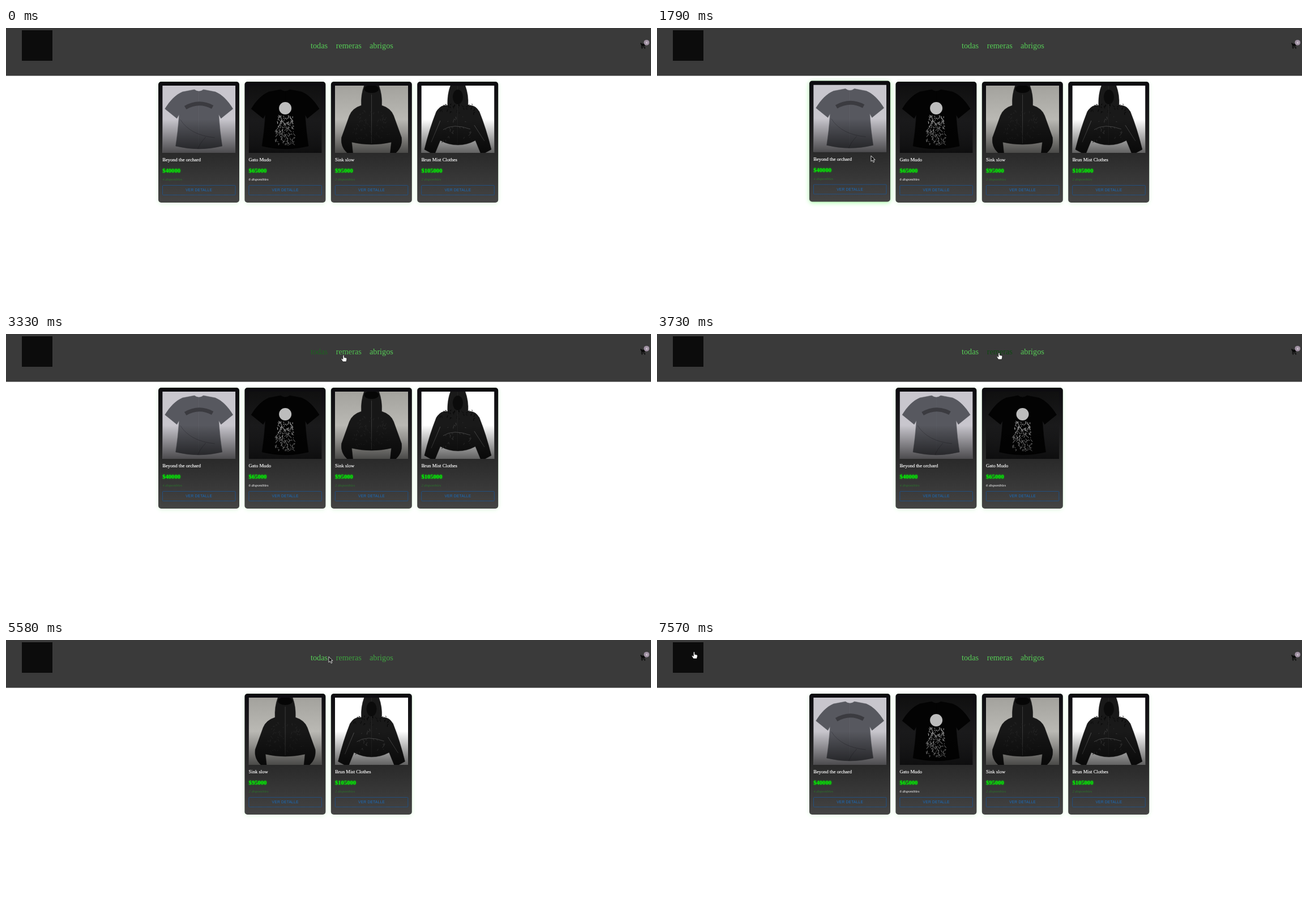
An HTML page that plays this animation: 1139 px wide and 492 px high, repeating every 8 s.

```html
<!DOCTYPE html>
<html lang="es">
<head>
<meta charset="utf-8">
<title>Tienda</title>
<style>
  html, body { margin: 0; width: 100%; height: 100%; overflow: hidden; background: #fff; }
  svg { display: block; width: 1139px; height: 492px; }
  text { font-family: "Liberation Serif", "Times New Roman", serif; }
  .link { font-size: 14.2px; }
  .name { font-size: 8.6px; fill: #fff; stroke: #fff; stroke-width: .15; }
  .price { font-size: 10.6px; font-weight: bold; fill: #00f500; text-shadow: 0 0 3px rgba(0, 255, 0, .7); }
  .stock { font-size: 6.6px; font-style: italic; fill: #2b742b; }
  .stock.many { fill: #fff; }
  .button { font: 6.7px "Liberation Sans", Arial, sans-serif; letter-spacing: .19px; fill: #1a6cbc; text-anchor: middle; }
</style>
</head>
<body>
<svg viewBox="0 0 1139 492" xmlns="http://www.w3.org/2000/svg">
  <defs>
    <linearGradient id="cardFill" x2="0" y2="1">
      <stop stop-color="#0c0b0f"/><stop offset=".55" stop-color="#272727"/><stop offset="1" stop-color="#444"/>
    </linearGradient>
    <linearGradient id="fade" x2="0" y2="1">
      <stop offset=".5" stop-opacity="0"/><stop offset="1" stop-opacity=".62"/>
    </linearGradient>
    <linearGradient id="wall" x2="0" y2="1"><stop stop-color="#a3a29d"/><stop offset=".7" stop-color="#c3c2bd"/></linearGradient>
    <linearGradient id="night" x2="0" y2="1"><stop stop-color="#101010"/><stop offset="1" stop-color="#242426"/></linearGradient>
    <filter id="blur" x="-20%" y="-20%" width="140%" height="140%"><feGaussianBlur stdDeviation="4"/></filter>
    <clipPath id="photo"><rect width="129" height="119"/></clipPath>
  </defs>
  <rect width="1139" height="492" fill="#fff"/>
  <rect width="1139" height="84.6" fill="#3a3a3a"/>
  <rect x="28" y="4" width="54" height="54" fill="#0c0c0c"/>
  <g id="nav"></g>
  <g fill="#0a0a0a">
    <path d="M1120 26.4h2l.8 1.4h6.6l-1.8 4.4h-4.4l-.7 1.1h6.2v1h-7.6l1.1-2.4-1.8-4.5h-.4z"/>
    <circle cx="1123.2" cy="35.5" r="1.1"/><circle cx="1128" cy="35.5" r="1.1"/>
  </g>
  <circle cx="1131.2" cy="25.8" r="4.9" fill="#a192a4"/>
  <text x="1131.2" y="27.9" font-size="6" fill="#fff" text-anchor="middle">4</text>
  <g id="cards"></g>
  <g id="cursor">
    <path id="arrow" d="M0 0V10L2.4 7.9 4.2 11.7 5.9 10.9 4.2 7.2H7.2Z" fill="#111" stroke="#fff" stroke-width=".8"/>
    <path id="hand" d="M-1.1 1Q0-.9 1.1 1V4.4L4.8 5.2Q6 5.6 5.9 7.2L4.9 12H-1.2L-4 7.6Q-3.9 6-2.6 6.6L-1.1 7.8Z" fill="#fff" stroke="#111" stroke-width=".7"/>
  </g>
</svg>
<script>
const LOOP = 8000, PITCH = 152.4, CARD_W = 143, CARD_H = 214, CARD_Y = 95;
const FADE = 200, STEP = 10;
const $ = id => document.getElementById(id);
const clamp = v => Math.max(0, Math.min(1, v));

function seeded(seed) {
  return () => (seed = (seed * 16807) % 2147483647) / 2147483647;
}

// Random short strokes around the vertical axis, widening downwards.
function scratches(count, top, height, width, color) {
  const rnd = seeded(count);
  let d = '';
  for (let i = 0; i < count; i++) {
    const v = rnd();
    const x = (rnd() - .5) * width * (.7 + .3 * v);
    d += `M${x.toFixed(1)} ${(top + v * height).toFixed(1)}l${((rnd() - .5) * 7).toFixed(1)} ${(rnd() * 5).toFixed(1)}`;
  }
  return `<path d="${d}" fill="none" stroke="${color}"/>`;
}

const backdrop = fill => `<rect width="129" height="119" fill="${fill}"/>`;

// Outline of the right half, mirrored on the garment's axis, with details on top.
function garment(color, half, details) {
  const side = `<path d="${half}Z" fill="${color}" stroke="${color}" stroke-width=".5"/>`;
  return `<g transform="translate(64.5 0)">${side}<g transform="scale(-1 1)">${side}</g>${details}</g>`;
}

const tee = 'M0 10Q4 10 8 7L29 11Q46 18 60 41L39 58 35 51Q37 82 41 107Q20 112 0 112';
const hood = 'M0 0H13Q19 16 18 35';

const photos = [
  backdrop('#c8c6cd') + garment('#57585f', tee,
    '<path d="M-24 39Q0 25 24 38" fill="none" stroke="#3b3b40" stroke-width="7"/>' +
    '<path d="M-33 60Q-15 88 28 92M12 91Q1 103-2 112" fill="none" stroke="#44444b"/>'),
  backdrop('url(#night)') + garment('#030303', tee,
    '<circle cy="40" r="11" fill="#bdbdbd"/>' + scratches(160, 52, 52, 38, '#a8a8a8')),
  backdrop('url(#wall)') + garment('#171717', hood + 'Q34 40 39 53L53 92Q55 108 43 119H33L35 100Q18 104 0 104',
    '<ellipse cy="6" rx="13" ry="7" fill="#060606"/><path d="M0 16V102" stroke="#3a3a3a"/>' +
    scratches(70, 44, 50, 70, '#252525')),
  backdrop('#fff') + garment('#191919', hood + 'Q30 33 38 46Q50 76 59 113L48 119 40 119 31 97Q16 105 0 105',
    '<ellipse cy="20" rx="9" ry="13" fill="#0b0b0b"/>' + scratches(40, 32, 16, 70, '#070707') +
    scratches(26, 55, 42, 64, '#3d3d3d') +
    '<path d="M-26 78Q-8 66 22 77M29 70L47 98M-31 62L-47 100" fill="none" stroke="#505050"/>')
];

const products = [
  ['Beyond the orchard', 40000, 4],
  ['Gato Mudo', 65000, 6],
  ['Sink slow', 95000, 2],
  ['Brun Mist Clothes', 105000, 2]
];

const panel = extra => `<rect width="${CARD_W}" height="${CARD_H}" rx="5" ${extra}/>`;

$('cards').innerHTML = products.map(([name, price, stock], i) => `<g>
  ${panel('class="glow" y="1.5" fill="#0f0" filter="url(#blur)"')}
  ${panel('fill="url(#cardFill)"')}
  <g transform="translate(7.2 7)" clip-path="url(#photo)">${photos[i]}${backdrop('url(#fade)')}</g>
  <text class="name" x="7.2" y="141">${name}</text>
  <text class="price" x="7.2" y="161">$${price}</text>
  <text class="stock${stock > 5 ? ' many' : ''}" x="7.2" y="175">${stock} disponibles</text>
  <rect x="7.5" y="183.5" width="128.5" height="17" rx="1" fill="none" stroke="#1d5590" stroke-width=".8"/>
  <text class="button" x="71.7" y="194.3">VER DETALLE</text></g>`).join('');

const menu = [
  { label: 'todas', x: 538, width: 30 },
  { label: 'remeras', x: 582.8, width: 45 },
  { label: 'abrigos', x: 642, width: 42 }
];
$('nav').innerHTML = menu.map(m => `<text class="link" x="${m.x}" y="36.3">${m.label}</text>`).join('');

const cards = [...$('cards').children];
const links = [...$('nav').children];

// The cursor travels to each stop between the times `from` and `to`, then rests there.
const stop = (from, to, x, y) => ({ from, to, x, y });
const entry = { x: 1062, y: 480 };
const stops = [
  stop(320, 730, 183, 22),
  stop(1520, 1600, 40, 24),
  stop(1600, 1790, 377, 226),
  stop(1790, 2180, 745, 240),
  stop(2180, 2320, 690, 246),
  stop(2390, 2680, 350, 245),
  stop(2680, 3070, 553, 33),
  stop(3260, 3330, 596, 37),
  stop(3330, 3560, 604, 33),
  stop(4130, 4860, 664, 33),
  stop(5390, 5580, 570, 29.5),
  stop(5580, 5850, 553, 30),
  stop(6780, 7170, 65.5, 21)
];

function cursorAt(t) {
  let { x, y } = entry;
  for (const s of stops) {
    const k = clamp((t - s.from) / (s.to - s.from));
    x += (s.x - x) * k;
    y += (s.y - y) * k;
  }
  return { x, y };
}

function shownAt(t) {
  if (t >= 3600 && t < 4990) return [0, 1];
  if (t >= 4990 && t < 6250) return [2, 3];
  return [0, 1, 2, 3];
}

const cardX = (slot, count) => 269 + ((4 - count) / 2 + slot) * PITCH;
const inBox = (p, x, y, w, h) => p.x >= x && p.x <= x + w && p.y >= y && p.y <= y + h;
const overLink = (t, m) => inBox(cursorAt(t), m.x, 22, m.width, 18);
const overLogo = t => inBox(cursorAt(t), 22, 4, 67, 55);

function overCard(t, i) {
  const shown = shownAt(t), slot = shown.indexOf(i);
  return slot >= 0 && inBox(cursorAt(t), cardX(slot, shown.length), CARD_Y, CARD_W, CARD_H);
}

// Hover amount 0..1, replayed from the recent cursor path.
function hoverAmount(t, isOver) {
  let amount = 0;
  for (let s = t - 3 * FADE; s < t; s += STEP) {
    amount = clamp(amount + (isOver(s) ? STEP : -STEP) / FADE);
  }
  return amount;
}

const mix = (from, to, k) => `rgb(${from.map((v, i) => Math.round(v + (to[i] - v) * k))})`;

function render(t) {
  const shown = shownAt(t);
  cards.forEach((card, i) => {
    const slot = shown.indexOf(i);
    const hover = hoverAmount(t, s => overCard(s, i));
    card.style.display = slot < 0 ? 'none' : '';
    card.setAttribute('transform', `translate(${cardX(slot, shown.length)} ${CARD_Y - 5 * hover})`);
    card.querySelector('.glow').setAttribute('opacity', .12 + .8 * hover);
  });
  links.forEach((link, i) => {
    link.setAttribute('fill', mix([86, 206, 86], [14, 74, 18], hoverAmount(t, s => overLink(s, menu[i]))));
  });
  const { x, y } = cursorAt(t);
  const pointing = overLogo(t) || menu.some(m => overLink(t, m));
  $('cursor').style.display = t < stops[0].from ? 'none' : '';
  $('cursor').setAttribute('transform', `translate(${x} ${y})`);
  $('hand').style.display = pointing ? '' : 'none';
  $('arrow').style.display = pointing ? 'none' : '';
}

const start = performance.now();
function tick() {
  render((performance.now() - start) % LOOP);
  requestAnimationFrame(tick);
}
tick();
</script>
</body>
</html>
```
